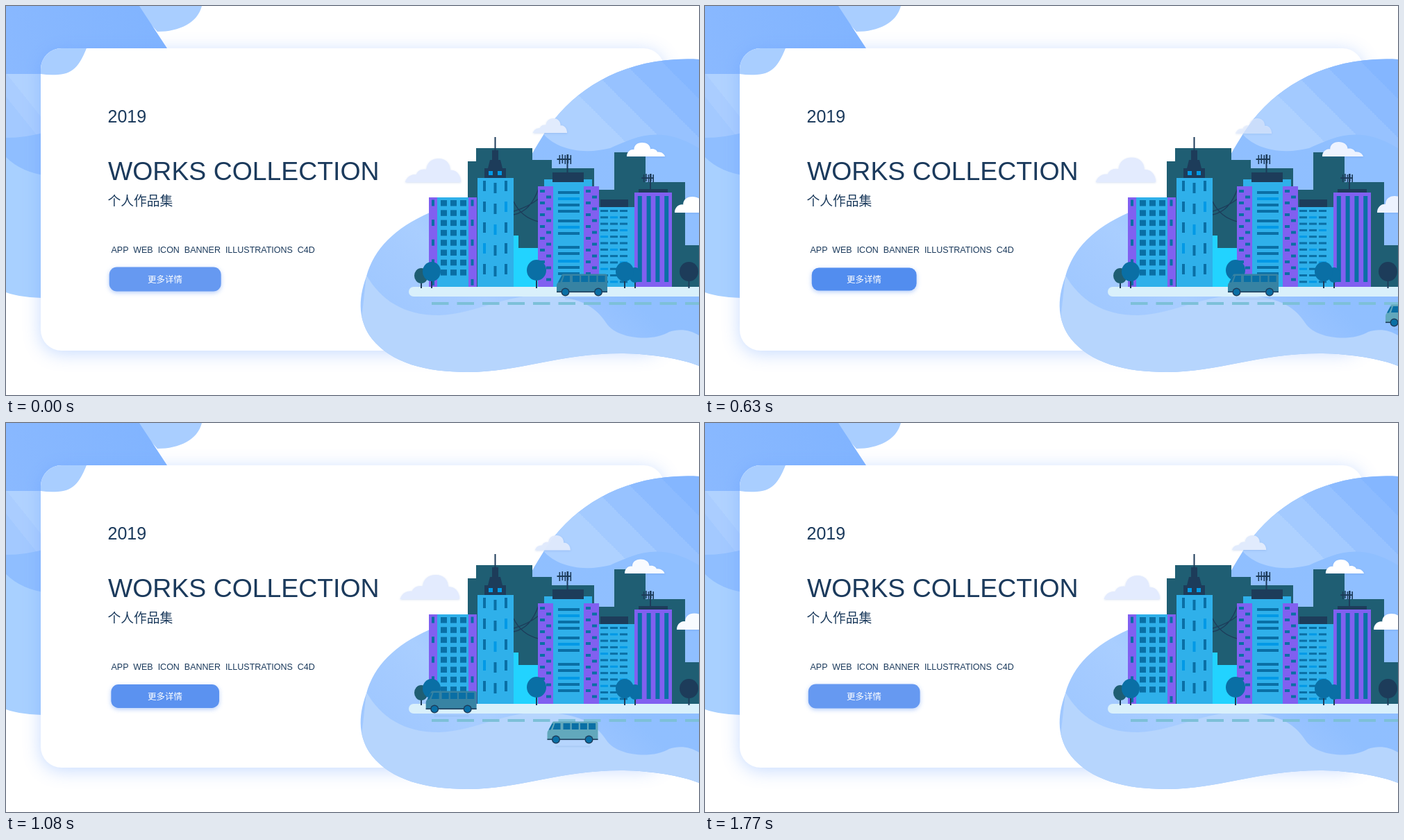
Recreate the animation shown at these times as an HTML page with a canvas. Size 998x561 px, loop 1800 ms.

```html
<!DOCTYPE html>
<html lang="zh">
<head>
<meta charset="utf-8">
<title>Works Collection</title>
<style>
html, body { margin: 0; width: 100%; height: 100%; overflow: hidden; background: #fff; }
canvas, svg { position: absolute; left: 0; top: 0; width: 998px; height: 561px; }
text { white-space: pre; fill: #1b3a5c; font-family: "Liberation Sans", Arial, sans-serif; }
.cjk { font-family: "Noto Sans CJK SC", "Noto Sans CJK", sans-serif; font-weight: 300; }
</style>
</head>
<body>
<canvas id="stage" width="998" height="561"></canvas>
<svg viewBox="0 0 998 561">
  <text x="146.500" y="168" font-size="25">2019</text>
  <text x="147" y="251" font-size="37.400">WORKS COLLECTION</text>
  <text class="cjk" x="146.500" y="288" font-size="18.750">个人作品集</text>
  <text x="151.500" y="356" font-size="12.500">APP  WEB  ICON  BANNER  ILLUSTRATIONS  C4D</text>
  <text class="cjk" x="204" y="399" font-size="12.500" style="fill:#fff">更多详情</text>
</svg>
<script>
const W = 998, H = 561, LOOP = 1800, STEP = 30;
const NAVY = '#1d3c5a', TEAL = '#1f5e73', BLUE = '#2fb0ea', DEEP = '#0a6fa5',
      BRIGHT = '#0099e6', PURPLE = '#8160f0';
const view = document.getElementById('stage').getContext('2d');
const scene = document.createElement('canvas');
scene.width = W; scene.height = H;
let g = scene.getContext('2d');

const blob = new Path2D('M998,77 C902,72 832,111 790,163 C770,190 762,206 745,235 ' +
  'C720,262 660,275 610,298 C560,320 530,350 519,390 C506,425 508,455 527,480 ' +
  'C555,515 605,528 665,528 C740,528 800,500 890,501 C930,502 970,508 998,519 Z');
const puff = new Path2D('M0,1 C.02,.8 .1,.64 .2,.68 C.22,.5 .31,.42 .38,.47 ' +
  'C.39,.16 .48,0 .6,0 C.73,0 .81,.2 .81,.5 C.92,.45 1,.72 1,.97 L1,1 Z');

function rect(c, x, y, w, h) { g.fillStyle = c; g.fillRect(x, y, w, h); }
function fill(c, d) { g.fillStyle = c; g.fill(typeof d === 'string' ? new Path2D(d) : d); }
function oval(c, x, y, rx, ry = rx) {
  g.fillStyle = c; g.beginPath(); g.ellipse(x, y, rx, ry, 0, 0, 7); g.fill();
}
function line(c, w, d) { g.strokeStyle = c; g.lineWidth = w; g.stroke(new Path2D(d)); }
function round(c, x, y, w, h, r) {
  g.fillStyle = c; g.beginPath(); g.roundRect(x, y, w, h, r); g.fill();
}
function shadow(c, blur, dy) { g.shadowColor = c; g.shadowBlur = blur; g.shadowOffsetY = dy; }
function ramp(x0, y0, x1, y1, stops) {
  const r = g.createLinearGradient(x0, y0, x1, y1);
  stops.forEach(([p, c]) => r.addColorStop(p, c));
  return r;
}
function bands(x0, y0, x1, y1, cols) {
  const n = cols.length;
  return ramp(x0, y0, x1, y1, cols.flatMap((c, i) => [[i / n, c], [(i + 1) / n, c]]));
}
// Smooth curve through [time, value] points
function track(t, k) {
  const n = k.length - 1;
  if (t <= k[0][0]) return k[0][1];
  if (t >= k[n][0]) return k[n][1];
  const slope = i => {
    const a = k[Math.max(0, i - 1)], b = k[Math.min(n, i + 1)];
    return (b[1] - a[1]) / (b[0] - a[0]);
  };
  let i = 0;
  while (t > k[i + 1][0]) i++;
  const d = k[i + 1][0] - k[i][0], u = (t - k[i][0]) / d, v = 1 - u;
  return v * v * (1 + 2 * u) * k[i][1] + u * u * (3 - 2 * u) * k[i + 1][1] +
    d * u * v * (v * slope(i) - u * slope(i + 1));
}

function backdrop() {
  rect('#fff', 0, 0, W, H);
  fill('#a9ceff', 'M185,0 H282 C276,24 250,37 218,37 Z');
  fill('#a8d0ff', 'M0,98 H70 V421 Q25,422 0,413 Z');
  fill(bands(0, 165, 50, 125, ['#a3c9ff', '#aacdff', '#b0d2ff']), 'M0,98 H70 V183 Q30,190 0,190 Z');
  fill('#8fbeff', 'M0,190 Q30,190 60,181 V245 Q22,240 0,218 Z');
  fill(ramp(0, 98, 200, 0, [[0, '#8ab9ff'], [1, '#81b4ff']]),
    'M0,0 H192 L232,61 V70 H116 V98 H0 Z');

  shadow('rgba(90,150,255,.34)', 26, 4);
  round('#fff', 50, 61, 898, 436, 30);
  shadow('transparent', 0, 0);
  g.save();
  g.beginPath(); g.roundRect(50, 61, 898, 436, 30); g.clip();
  fill('#a9ceff', 'M50,61 H116 C108,80 100,98 75,99 Q62,100 50,98 Z');
  g.restore();

  g.save();
  g.clip(blob);
  rect(ramp(540, 420, 840, 120, [[0, '#a0c8ff'], [.15, '#a5cbff'], [.25, '#a9ceff'],
    [.42, '#9cc5ff'], [.6, '#90bfff'], [1, '#8fbfff']]), 500, 60, 498, 480);
  fill(bands(810, 170, 950, 30, ['#aed1ff', '#a3caff', '#97c2ff', '#8cbbff', '#84b6ff']),
    'M770,180 C790,207 830,215 870,205 C905,190 940,170 998,205 V60 H740 Z');
  fill('#b6d5fd', 'M519,388 C540,425 575,447 625,446 C680,443 720,415 775,417 ' +
    'C830,420 850,435 865,458 C880,480 930,485 955,470 C970,465 985,467 998,475 V561 H500 Z');
  g.restore();
}

function aerial(x, y, base, s) {
  rect(NAVY, x - 1, y, 2, base - y);
  rect(NAVY, x - 15 * s, y + 6 * s, 20 * s, 2);
  for (let i = 0; i < 5; i++) rect(NAVY, x + (i * 4 - 12) * s, y + (i % 2 ? 0 : 1), 1.6, 13 * s);
}

function leftBlock() {
  rect(PURPLE, 609, 276, 69, 129);
  rect(BLUE, 621, 276, 45, 129);
  for (let r = 0; r < 8; r++)
    for (let c = 0; c < 3; c++) rect(DEEP, 626 + c * 14, 280 + r * 14.3, 9, 8.500);
  for (let r = 0; r < 5; r++) for (const x of [613, 669.5]) rect(DEEP, x, 279.5 + r * 28.6, 4, 9);
}

function tower() {
  rect(BLUE, 679, 248, 52, 157);
  for (let r = 0; r < 5; r++)
    for (let c = 0; c < 3; c++)
      rect((r + c) % 4 === 3 ? BRIGHT : DEEP, 687 + c * 15.5, 252 + r * 30 + (c % 2) * 3, 4, 15);
  rect(NAVY, 689, 234, 31, 14);
  fill(NAVY, 'M694,234 L697,222 H712 L715,234 Z');
  rect(NAVY, 700, 208, 9, 14);
  rect(NAVY, 703.5, 189, 2, 20);
  rect(BRIGHT, 695, 238, 6, 6);
  rect(BRIGHT, 708, 238, 6, 6);
}

function midBlock() {
  rect(BLUE, 775, 250, 69, 155);
  rect(PURPLE, 766, 260, 22, 145);
  rect(PURPLE, 832, 260, 22, 145);
  rect(NAVY, 787, 240, 45, 14);
  aerial(808.5, 214, 240, 1);
  [267, 276, 285, 294, 308, 317, 326, 346, 355, 366, 375, 384].forEach((y, i) =>
    rect(i % 4 === 1 ? BRIGHT : DEEP, 795, y, 31, 4));
  for (let r = 0; r < 8; r++)
    [769, 778, 835, 844].forEach((x, c) => rect(DEEP, x, 265 + r * 17 + (c % 2) * 8.5, 7, 4));
}

function rightBlocks() {
  rect(BLUE, 854, 290, 51, 115);
  rect(NAVY, 856, 279, 40, 11);
  for (let r = 0; r < 12; r++)
    for (let c = 0; c < 3; c++)
      rect((r * 2 + c) % 5 === 3 ? BRIGHT : DEEP, 856 + c * 14, 294 + r * 9.3, 11, 3);
  rect(PURPLE, 905, 269, 54, 136);
  rect(NAVY, 911, 264, 42, 5);
  for (let i = 0; i < 4; i++) rect(DEEP, 909.8 + i * 12.8, 274, 6, 124);
  aerial(928, 242, 264, .85);
}

function tree(c, x, y, rx, ry) {
  rect(NAVY, x - 1, y, 2, 407 - y);
  oval(c, x, y, rx, ry);
}

function city() {
  fill(TEAL, 'M665,405 V224 H677 V205 H758 V222 H786 V234 H847 V265 H876 V211 H921 V254 H978 V345 H998 V405 Z');
  rect('#22d3ff', 731, 331, 7, 74);
  rect('#22d3ff', 731, 349, 35, 56);
  line(NAVY, 1.3, 'M731,301 Q756,296 767,263 M731,282 Q742,305 767,311 M731,296 Q752,290 767,278');
  leftBlock();
  tower();
  midBlock();
  rightBlocks();
  round('#d9f0fb', 580, 405, 440, 14, 7);
  tree(TEAL, 598, 389, 10, 11);
  tree(DEEP, 613, 383, 13, 14);
  tree(DEEP, 764, 381, 14, 15);
  tree(DEEP, 906, 388, 9, 11);
  tree(DEEP, 891, 383, 13, 14);
  tree(NAVY, 983.5, 383, 13.5, 14);
  for (let i = 0; i < 11; i++) rect('#7dc0d8', 613 + i * 36.5, 427, 24.5, 4);
}

function bus(x, y, body) {
  g.save();
  g.clip(blob);
  g.translate(x, y);
  rect('rgba(60,120,180,.1)', 12, 35, 50, 2);
  fill(body, 'M9,0 H70 Q73,0 73,3 V26 H0 V17 Q0,14 2,12 L7,2 Q8,0 9,0 Z');
  rect(NAVY, 0, 25, 73, 1.6);
  fill(DEEP, 'M7,3 H9 L5,12 H2 Z');
  fill(DEEP, 'M11,2.5 H19 V11.5 H8 Z');
  for (let i = 0; i < 4; i++) rect(DEEP, 23 + i * 12.2, 2.500, 10, 9);
  for (const cx of [12.5, 60]) {
    oval(NAVY, cx, 26, 6);
    oval(DEEP, cx, 26, 4.600);
  }
  g.restore();
}

// Swapping the two side edges mirrors the cloud
function cloud(x0, x1, top, base, color, alpha = 1) {
  g.save();
  g.globalAlpha = alpha;
  shadow('rgba(70,120,200,.22)', 3, 1);
  g.translate(x0, top);
  g.scale(x1 - x0, base - top);
  fill(color, puff);
  g.restore();
}

function button(p) {
  const k = (1 - Math.cos(p * 2 * Math.PI)) / 2, s = 1 - .096 * k;
  const w = 161 * s, h = 35 * s;
  shadow('rgba(70,130,240,.4)', 6, 2);
  round(`rgb(${102 - 31 * k},${153 - 19 * k},${241 - 3 * k})`, 229.2 - w / 2, 394 - h / 2, w, h, 11 * s);
  shadow('transparent', 0, 0);
}

const drift = [[0, 0], [270, .5], [600, 1], [900, .75], [1260, .45], [1530, .2], [1800, 0]];
const edge = [[0, 0], [270, .67], [630, 1], [900, .4], [1260, .3], [1530, 0], [1800, 0]];
const upper = [[0, 793], [270, 784], [630, 753], [900, 701], [1260, 460], [1500, 100]];
const lower = [[540, 1006], [630, 980], [900, 880], [1260, 670], [1530, 507], [1770, 380]];

function draw(t) {
  const w = track(t, drift), e = track(t, edge);
  const tint = `rgb(${255 - 18 * w * w},${255 - 12 * w * w},255)`;
  g.drawImage(scene, 0, 0);
  button(t % 900 / 900);
  cloud(575 - 12 * w, 655 - 6 * e, 220 - 1.5 * w, 254, '#e3ebfe');
  cloud(759 + 5 * w, 808 + 8 * w, 162, 183 + w, '#e1ebfd', 1 - .35 * w ** 4);
  cloud(949 - w, 894 - 5 * w, 197 - w, 217, tint);
  cloud(1027 + 4 * w, 963 + 5 * w, 275 - w, 298, tint);
  bus(track(t, upper), 386.5, '#3783a3');
  bus(track(t, lower), 430.5, '#62a8bc');
}

backdrop();
city();
g = view;
const start = performance.now();
function tick() {
  const t = (performance.now() - start) % LOOP;
  draw(Math.floor(t / STEP) * STEP);
  requestAnimationFrame(tick);
}
tick();
</script>
</body>
</html>
```
